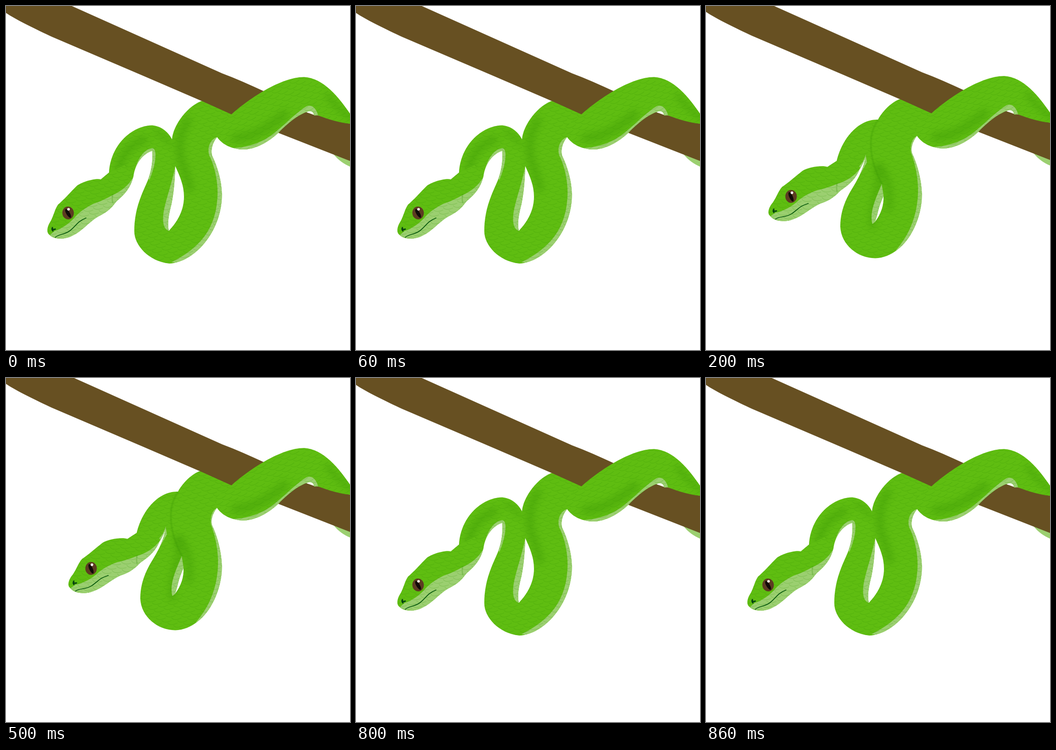
Recreate the animation shown at these times as an HTML page with a canvas. Size 748x748 px, loop 900 ms.

```html
<!DOCTYPE html>
<html lang="en">
<head>
<meta charset="utf-8">
<title>Snake on a branch</title>
<style>
html, body { margin: 0; width: 100%; height: 100%; overflow: hidden; background: #fff; }
canvas { display: block; width: 748px; height: 748px; }
</style>
</head>
<body>
<canvas id="stage" width="748" height="748"></canvas>
<script>
const ctx = document.getElementById('stage').getContext('2d');
const GREEN = '#5fbd11', BELLY = '#9bcf70', BARK = '#675022', SHADE = '#328f00';
const shape = d => new Path2D(d);

const branch = shape('M-5 -5H131L142 -0.5L470 146.5C500 157.5 530 171 560 185L656 232L748 256L760 260V342L748 337L590 275L491 236L430 208.5L300 152.5L100 67C70 53 20 29 0 15L-5 11Z');
const tail = shape('M712 322L750 335V350C736 344 724 337 712 322Z');

const front = {
  outline: shape('M491 235C530 200 600 154 648 154.5C690 156 725 200 748 234L760 250V258L748 256C725 254 700 246 679 238L670 238C669 230 663 226 655 230C636 236 612 255 593 275C571 296 541 312.5 515 312C490 311 470 301 459 285L455 262Z'),
  bellies: [shape('M490 309C550 307 580 280 600 262C620 244 640 226 652 219C664 212 675 222 679 239L665 250L600 320L500 330Z')],
  shades: [['M500 287C540 285 570 265 605 236', 20], ['M700 195Q720 225 752 243', 12]],
  slant: -0.5
};

const head = {
  outline: shape('M224 362L206 377C195 374 165 382 153 392C140 405 125 422 113 432C106 442 104 455 97 468C90 478 87 492 94 497C104 509 130 508 145 499C165 490 180 470 200 458C225 446 232 435 240 425C258 410 271 395 277 371L258 346Z'),
  bellies: [shape('M92 501L106 489C122 484 140 471 150 459C160 448 172 439 190 430C205 425 220 418 232 411C253 402 268 388 278 370L300 380L200 520L80 520Z')],
  shades: [],
  slant: -0.2
};

// "head" is the nostril position and tilt; "rise" lifts branch and front coil.
const poses = [
  {
    head: [103, 486, 0], rise: 0, mark: [232, 410],
    outline: shape('M470 200L430 205C395 215 363 260 361 290C350 268 330 259.5 316 259.5C275 261 228 300 224 362L238 390L277 371C281 340 300 320 318 315C320 335 316 360 308 380C296 408 279 440 279 490C279 520 310 555 355 560C408 558 469.5 492 469.5 410C469 380 460 350 448 325C445 312 449 297 459 285L500 250ZM368 348C378 370 387 390 387 415C387 445 372 470 354 489C350 470 355 450 360 430C366 400 367 375 368 348Z'),
    bellies: [
      shape('M459 285C443 290 437 310 442 325C455 350 461 385 460 410C458 470 435 520 360 557L480 570V300Z'),
      shape('M368 348C360 390 344 430 342 455C340 475 345 486 354 489L374 400Z'),
      shape('M277 370C285 330 300 312 318 309C330 310 326 345 312 378L298 365Z')
    ],
    shades: [['M300 290C265 305 252 325 245 355', 18], ['M395 250C375 280 372 320 388 355L400 395', 18], ['M325 275Q345 280 355 300', 9]]
  },
  {
    head: [117, 471, 0], rise: -1, mark: [232, 407],
    outline: shape('M470 200L420 206C395 214 370 245 367 268C355 258 340 254.5 328 254.5C280 257 246 298 236 350L250 378L290 357C294 334 312 316 334 310C335 335 328 355 318 375C302 406 281 438 281 485C281 524 315 558 358 559C408 557 469.5 492 469.5 410C469 380 460 350 448 325C445 312 449 297 459 284L500 250ZM378 374C384 385 387 398 387 415C387 445 372 470 355 488C350 470 356 452 363 435C371 415 376 397 378 374Z'),
    bellies: [
      shape('M459 284C443 290 437 310 442 325C455 350 461 385 460 410C458 470 435 520 360 557L480 570V300Z'),
      shape('M381 346C374 385 346 435 344 460C343 475 347 485 354 488L382 420Z'),
      shape('M290 357C298 325 315 306 333 304C344 305 341 340 324 368L310 360Z')
    ],
    shades: [['M425 225C400 260 398 310 406 370L402 395', 18], ['M372 270Q385 300 382 345', 9]]
  },
  {
    head: [149, 446, 0.117], rise: -2.3, mark: [285, 386],
    outline: shape('M470 195L420 203C402 210 383 230 374 247C330 246 295 290 284 338L300 366L335 354C341 343 345 336 347 325C343 358 325 385 313 405C298 432 292 455 292 480C294 520 330 548 368 548.5C386 548 402 541 416 530C443 511 469.5 462 469.5 410C469 380 460 345 448 320C445 308 449 295 459 282L500 250ZM386 413C387 432 381 452 367 470C373 455 374 445 377 436C380 427 383 420 386 413Z'),
    bellies: [
      shape('M459 282C445 290 444 308 446 320C456 345 462 380 461 405C460 450 445 495 413 531L480 540V300Z'),
      shape('M382 387C374 408 360 435 360 460C360 467 361 472 362 474L368 469L380 440L386 412Z'),
      shape('M347 323C344 338 334 350 316 365L330 375L350 340Z')
    ],
    shades: [['M372 350C386 390 357 420 362 478', 14], ['M378 350Q405 380 398 440', 14], ['M374 249C354 274 350 325 382 386', 3, 1]]
  }
];

const scales = new Path2D();
for (let row = -90; row < 105; row++) {
  for (let col = -42; col < 50; col++) {
    const x = col * 22 + (row & 1) * 11, y = row * 8.5;
    scales.moveTo(x, y);
    scales.quadraticCurveTo(x + 4, y + 8, x + 20, y + 5);
  }
}

function fill(path, color) {
  ctx.fillStyle = color;
  ctx.fill(path, 'evenodd');
}

function line(path, color, width) {
  ctx.strokeStyle = color;
  ctx.lineWidth = width;
  ctx.stroke(path);
}

function drawSkin({ outline, bellies, shades, slant = -0.25 }) {
  fill(outline, GREEN);
  ctx.save();
  ctx.clip(outline, 'evenodd');
  for (const [d, width, blur = 7] of shades) {
    ctx.filter = `blur(${blur}px)`;
    ctx.globalAlpha = 0.3;
    line(shape(d), SHADE, width);
  }
  ctx.filter = 'none';
  ctx.globalAlpha = 1;
  for (const belly of bellies) fill(belly, BELLY);
  ctx.rotate(slant);
  ctx.globalAlpha = 0.2;
  line(scales, SHADE, 1.4);
  ctx.restore();
}

function ellipse(x, y, rx, ry, angle, color) {
  ctx.beginPath();
  ctx.ellipse(x, y, rx, ry, angle, 0, Math.PI * 2);
  ctx.fillStyle = color;
  ctx.fill();
}

function drawHead([x, y, tilt]) {
  ctx.save();
  ctx.translate(x, y);
  ctx.rotate(tilt);
  ctx.translate(-103, -486);
  drawSkin(head);
  line(shape('M107 503C115 495 129 498 141 487C153 477 156 468 174 461'), '#07570d', 1.7);
  line(shape('M101 482Q99 486 102 489M101 485Q104 487 107 485'), '#064410', 3);
  ellipse(135, 450, 12.5, 14, -0.1, '#5d3c22');
  ellipse(135, 451, 3.8, 11, -0.55, '#100b08');
  ellipse(136, 442, 2.8, 2.8, 0, '#fff');
  ctx.restore();
}

function drawPose(pose) {
  ctx.fillStyle = '#fff';
  ctx.fillRect(0, 0, 748, 748);
  drawSkin(pose);
  drawHead(pose.head);
  const [mx, my] = pose.mark;
  ctx.globalAlpha = 0.25;
  line(shape(`M${mx} ${my}q-2 9 0 17`), SHADE, 3);
  ctx.globalAlpha = 1;
  ctx.save();
  ctx.translate(0, pose.rise);
  fill(tail, BELLY);
  fill(branch, BARK);
  // the gap under the arch shows background above the branch
  fill(shape('M654 231Q665 224 670 237Z'), '#fff');
  drawSkin(front);
  ctx.restore();
}

function poseAt(ms) {
  if (ms < 100 || ms >= 800) return poses[0];
  return ms < 200 || ms >= 700 ? poses[1] : poses[2];
}

ctx.lineCap = ctx.lineJoin = 'round';
let start = null, shown = null;
function tick(now) {
  start ??= now;
  const pose = poseAt((now - start) % 900);
  if (pose !== shown) drawPose(shown = pose);
  requestAnimationFrame(tick);
}
drawPose(shown = poses[0]);
requestAnimationFrame(tick);
</script>
</body>
</html>
```
